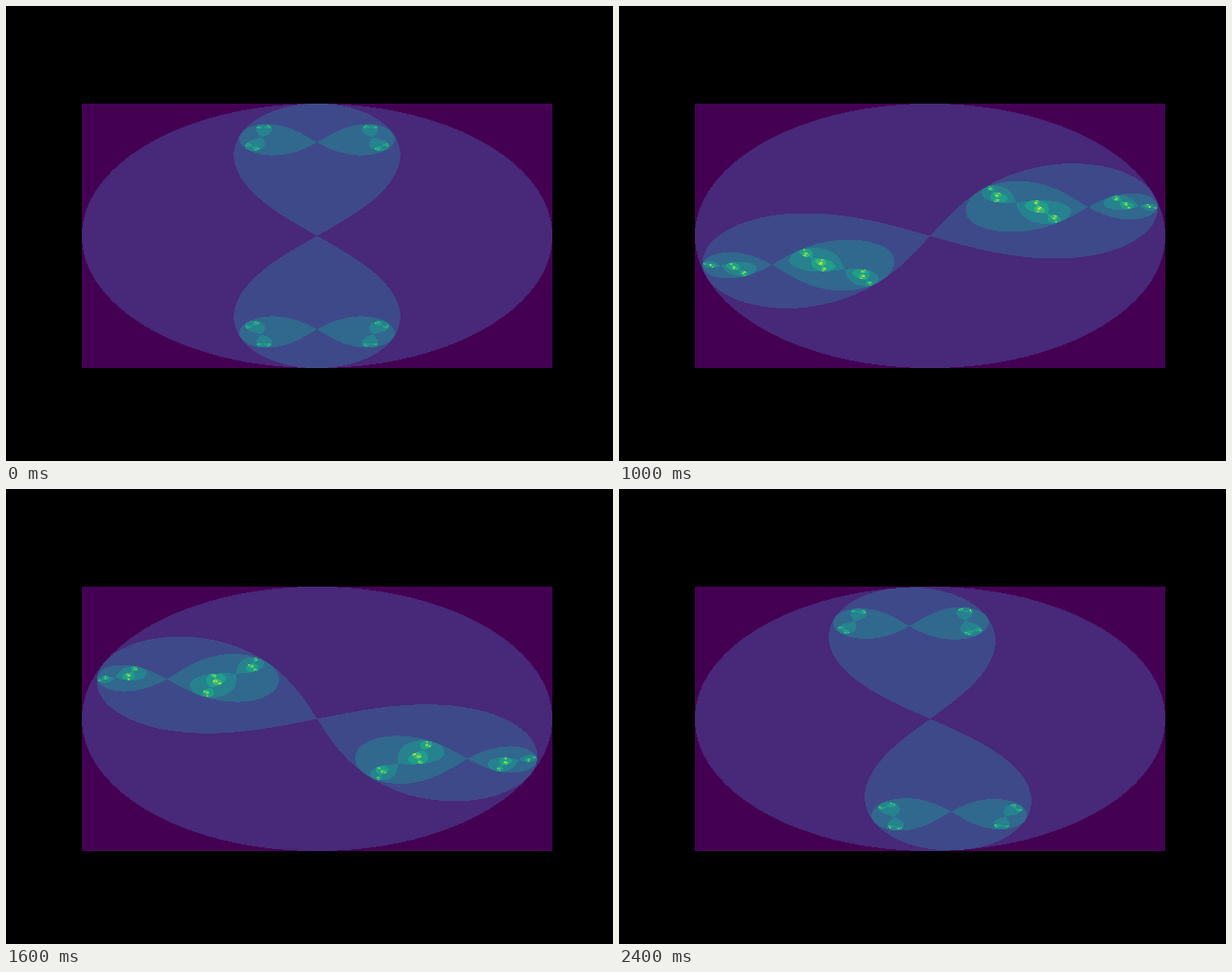
Write an HTML page with a canvas that moves like this. It is 640x480 px and loops after 2500 ms.

```html
<!DOCTYPE html>
<html lang="en">
<head>
<meta charset="utf-8">
<title>Julia set</title>
<style>
  html, body { margin: 0; width: 100%; height: 100%; overflow: hidden; background: #000; }
  canvas { display: block; }
</style>
</head>
<body>
<canvas id="stage" width="640" height="480"></canvas>
<script>
const ctx = document.getElementById('stage').getContext('2d');
const LEFT = 80, TOP = 103, W = 496, H = 279;
const STEPS = 25, STEP_MS = 100, RADIUS = 2;

// Viridis in ten steps, one per escape count.
const palette = [
  '440154', '482878', '3e4989', '31688e', '26828e',
  '1f9e89', '35b779', '6ece58', 'b5de2b', 'fde725'
].map(hex => {
  const v = parseInt(hex, 16);
  return [v >> 16, v >> 8 & 255, v & 255];
});
const MAX = palette.length - 1;

const image = ctx.createImageData(W, H);

function escapeCount(x, y, cx, cy) {
  let n = 0;
  while (n < MAX && x * x + y * y <= RADIUS * RADIUS) {
    const re = x * x - y * y + cx;
    y = 2 * x * y + cy;
    x = re;
    n++;
  }
  return n;
}

// Centre of pixel i mapped onto [-2, 2].
const coord = (i, size) => RADIUS * (2 * i + 1 - size) / size;

function draw(step) {
  const angle = 2 * Math.PI * step / STEPS;
  const cx = RADIUS * Math.cos(angle), cy = RADIUS * Math.sin(angle);
  const data = image.data;
  let p = 0;
  for (let j = 0; j < H; j++) {
    const y = coord(j, H);
    for (let i = 0; i < W; i++) {
      const [r, g, b] = palette[escapeCount(coord(i, W), y, cx, cy)];
      data[p++] = r;
      data[p++] = g;
      data[p++] = b;
      data[p++] = 255;
    }
  }
  ctx.putImageData(image, LEFT, TOP);
}

ctx.fillStyle = '#000';
ctx.fillRect(0, 0, 640, 480);

const start = performance.now();
let shown = 0;
draw(shown);

function tick() {
  const step = Math.floor((performance.now() - start) / STEP_MS) % STEPS;
  if (step !== shown) draw(shown = step);
  requestAnimationFrame(tick);
}
requestAnimationFrame(tick);
</script>
</body>
</html>
```
